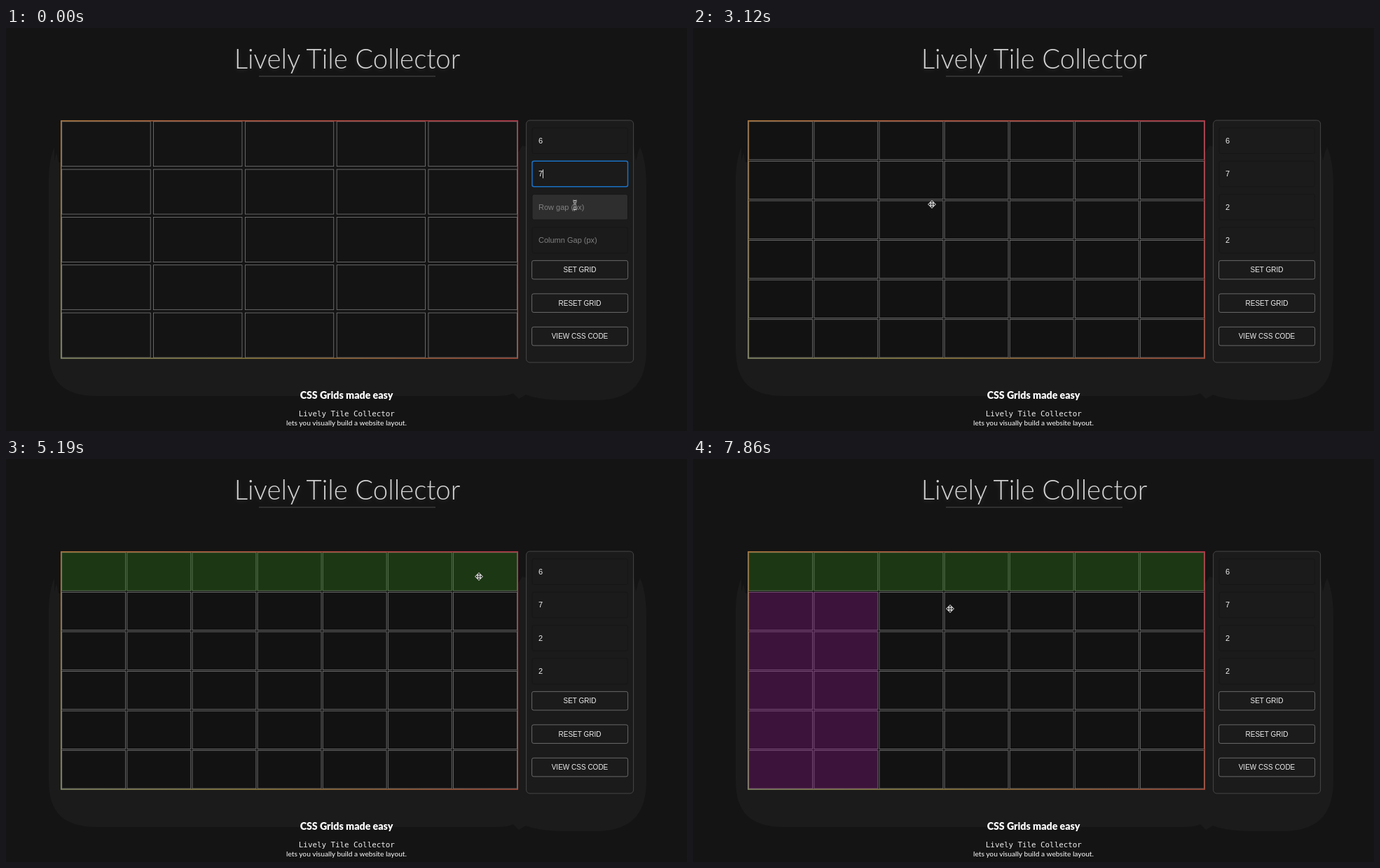
Recreate the animation shown at these times as an HTML page. Size 972x576 px, loop 8000 ms.

```html
<!DOCTYPE html>
<html lang="en">
<head>
<meta charset="utf-8">
<title>Lively Tile Collector</title>
<style>
  html, body { margin: 0; width: 100%; height: 100%; overflow: hidden; background: #141414; }
  svg { display: block; width: 972px; height: 576px; }
  text { fill: #fff; font-family: "Liberation Sans", Arial, sans-serif; }
  .mid { text-anchor: middle; }
  .title { font: 300 38.4px Lato, sans-serif; fill: #d4d4d4; text-shadow: 0 2px 7px rgba(255,255,255,.13); }
  .head { font: 900 14.2px Lato, sans-serif; }
  .mono { font: 10.83px "DejaVu Sans Mono", monospace; fill: #eee; }
  .note { font: 10.2px Lato, sans-serif; }
  .button { font-size: 10px; fill: #eee; }
  .field { font-size: 11px; }
  .thin { stroke: #828282; stroke-width: .75; }
</style>
</head>
<body>
<svg viewBox="0 0 972 576">
  <defs>
    <linearGradient id="top"><stop stop-color="#b37a3c"/><stop offset=".5" stop-color="#bd513f"/><stop offset="1" stop-color="#bd3749"/></linearGradient>
    <linearGradient id="bottom"><stop stop-color="#8b8f6a"/><stop offset=".4" stop-color="#97853f"/><stop offset="1" stop-color="#b0503c"/></linearGradient>
    <linearGradient id="left" x2="0" y2="1"><stop stop-color="#b07b45"/><stop offset="1" stop-color="#8b8f6a"/></linearGradient>
    <linearGradient id="right" x2="0" y2="1"><stop stop-color="#bd3749"/><stop offset="1" stop-color="#b0503c"/></linearGradient>
    <path id="bar" d="M-2.6-5.8Q0-5.8 0-4Q0-5.8 2.6-5.8M0-4V4M-2.6 5.8Q0 5.8 0 4Q0 5.8 2.6 5.8M-1.5 1H1.5"/>
  </defs>

  <path fill="#1b1b1b" d="M61 215C61 195 65 180 69 170V190L72 178 75 192H731V178L737 168 743 170H896L899 190 902 178 905 170Q914 190 914 225V460C914 510 890 532 840 532H800Q762 532 742 524L732 530 724 522Q717 526 700 526H130C82 526 61 505 61 460Z"/>

  <text class="mid title" x="487" y="58">Lively Tile Collector</text>
  <path d="M361 69H613" stroke="#4c4c4c" stroke-width="1.2"/>
  <text class="mid head" x="486" y="530">CSS Grids made easy</text>
  <text class="mid mono" x="486.3" y="555">Lively Tile Collector</text>
  <text class="mid note" x="486" y="568.3">lets you visually build a website layout.</text>

  <rect x="78" y="132" width="653" height="341" fill="#141414"/>
  <g id="cells"></g>
  <g fill-opacity=".3">
    <rect id="green" x="79.4" y="133.4" width="650.3" height="55.1" fill="#328c14"/>
    <rect id="purple" x="79.4" y="190" width="184.8" height="281.5" fill="#9d1496"/>
  </g>
  <rect x="78" y="132" width="1.4" height="340" fill="url(#left)"/>
  <rect x="729.6" y="132" width="1.4" height="340" fill="url(#right)"/>
  <rect x="78" y="471.4" width="653" height="1.4" fill="url(#bottom)"/>
  <rect x="78" y="131.9" width="653" height="1.5" fill="url(#top)"/>

  <rect x="742.6" y="132" width="153" height="346" rx="5" fill="#1b1b1b" stroke="#555" stroke-width=".75"/>
  <g id="panel"></g>

  <g id="beam" fill="none">
    <use href="#bar" stroke="#e8e8e8" stroke-width="2.8"/>
    <use href="#bar" stroke="#111"/>
  </g>
  <path id="move" d="M0-5.5L2.6-2.6H.8V-.8H2.6V-2.6L5.5 0 2.6 2.6V.8H.8V2.6H2.6L0 5.5-2.6 2.6H-.8V.8H-2.6V2.6L-5.5 0-2.6-2.6V-.8H-.8V-2.6H-2.6Z" fill="#111" stroke="#f2f2f2" stroke-linejoin="round"/>
  <path id="arrow" d="M0 0V11L2.6 8.6 4.3 12.4 6 11.6 4.4 8H8Z" stroke="#fff" stroke-width=".9"/>
</svg>
<script>
const LOOP = 8000, TICKS = 54;

const $ = id => document.getElementById(id);
const show = (el, on) => el.setAttribute('visibility', on ? 'visible' : 'hidden');
const within = (v, from, to) => v >= from && v < to;

function set(el, attrs) {
  for (const key in attrs) el.setAttribute(key, attrs[key]);
}
function add(parent, tag, attrs, text = '') {
  const el = document.createElementNS('http://www.w3.org/2000/svg', tag);
  set(el, attrs);
  el.textContent = text;
  return parent.appendChild(el);
}

function makeGrid(rows, cols, gap, fill) {
  const group = add($('cells'), 'g', { fill });
  const stepX = (650.3 + gap) / cols, stepY = (338 + gap) / rows, inset = .37;
  for (let r = 0; r < rows; r++) for (let c = 0; c < cols; c++) {
    add(group, 'rect', {
      class: 'thin', x: 79.4 + c * stepX + inset, y: 133.4 + r * stepY + inset,
      width: stepX - gap - 2 * inset, height: stepY - gap - 2 * inset
    });
  }
  return group;
}
const oldGrid = makeGrid(5, 5, 3.65, '#141414');
const newGrid = makeGrid(6, 7, 1.46, '#121212');

// "typed" is the tick at which the value replaces the hint
const fields = [
  { value: '6', typed: 0 },
  { value: '7', typed: 0 },
  { value: '2', typed: 7, hint: 'Row gap (px)' },
  { value: '2', typed: 13, hint: 'Column Gap (px)' }
];
fields.forEach((f, i) => {
  f.y = 142.8 + i * 47.45;
  f.box = add($('panel'), 'rect', { x: 751, y: f.y, width: 136.5, height: 36.5, rx: 2.5 });
  f.label = add($('panel'), 'text', { class: 'field', x: 760, y: f.y + 22.2 });
});
const caret = add($('panel'), 'rect', { width: 1, height: 12.5, fill: '#ddd' });

['SET GRID', 'RESET GRID', 'VIEW CSS CODE'].forEach((name, i) => {
  const y = 332.4 + i * 47.45;
  add($('panel'), 'rect', { class: 'thin', x: 750.6, y, width: 137, height: 26.6, rx: 2.5, fill: '#1b1b1b' });
  add($('panel'), 'text', { class: 'mid button', x: 819, y: y + 16.8 }, name);
});

const linear = p => p;
const easeOut = p => 1 - (1 - p) ** 2;
const smooth = p => p * p * (3 - 2 * p);

const start = { x: 812, y: 253 };
const moves = [
  { from: 7, to: 10, x: 810.5, y: 302.5, ease: smooth },  // to the last field
  { from: 13, to: 15, x: 815, y: 336, ease: linear },     // to the button
  { from: 16, to: 21, x: 341, y: 252, ease: linear },     // over to the grid
  { from: 21, to: 27, x: 141, y: 170, ease: easeOut },
  { from: 28, to: 34, x: 675, y: 168, ease: smooth },     // drag the top row
  { from: 36, to: 41, x: 140, y: 222, ease: smooth },
  { from: 41, to: 46, x: 213, y: 414, ease: easeOut },    // drag the left side
  { from: 47, to: 49, x: 216, y: 436, ease: easeOut },
  { from: 51, to: 53, x: 367, y: 214, ease: linear }
];

function pointerAt(tick) {
  let { x, y } = start;
  for (const m of moves) {
    const p = m.ease(Math.min(1, Math.max(0, (tick - m.from) / (m.to - m.from))));
    x += (m.x - x) * p;
    y += (m.y - y) * p;
  }
  return { x, y };
}

function draw(tick) {
  const { x, y } = pointerAt(tick);
  const focus = tick < 2 ? 1 : tick < 10 ? 2 : tick < 16 ? 3 : -1;

  fields.forEach((f, i) => {
    const filled = tick >= f.typed, focused = i === focus;
    const hover = x > 750 && within(y, f.y, f.y + 37);
    set(f.box, {
      fill: hover ? '#2e2e2e' : '#1b1b1b',
      stroke: focused ? '#1b72c6' : '#161616',
      'stroke-width': focused ? 1.5 : 1
    });
    f.label.textContent = filled ? f.value : f.hint;
    f.label.style.fill = filled ? '#eee' : '#808080';
    if (focused) set(caret, { x: filled ? 766 : 760, y: f.y + 12 });
  });
  show(caret, focus > 0 && !within(tick, 5, 7));

  show(oldGrid, tick < 16);
  show(newGrid, tick >= 16);
  show($('green'), tick >= 35);
  show($('purple'), tick >= 50);

  // the pointer hides while typing
  const typing = fields.some(f => f.hint && f.typed === tick);
  const kind = x < 731 ? 'move' : y < 324 ? 'beam' : 'arrow';
  for (const id of ['beam', 'move', 'arrow']) show($(id), id === kind && !typing);
  set($(kind), { transform: `translate(${x} ${y})` });
}

function play() {
  draw(Math.floor(performance.now() % LOOP / LOOP * TICKS));
  requestAnimationFrame(play);
}
play();
</script>
</body>
</html>
```
